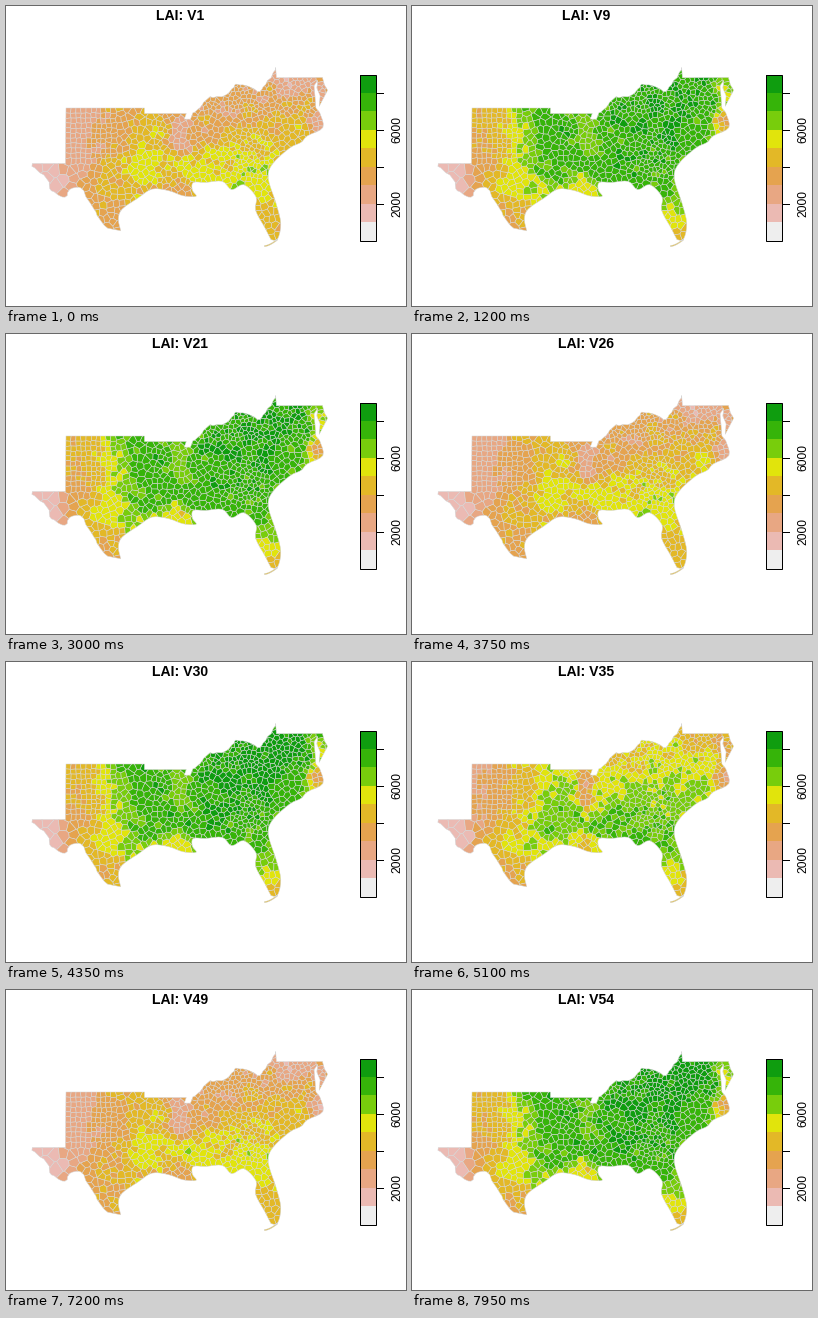
A matplotlib script for the animation above (8000 ms loop, 400 by 300 pixels).

```python
import numpy as np
import matplotlib.pyplot as plt
from matplotlib.animation import FuncAnimation
from matplotlib.collections import PolyCollection
from matplotlib.patches import PathPatch, Rectangle
from matplotlib.path import Path

WIDTH, HEIGHT, DPI = 400, 300, 100
PX = 72 / DPI
TICK_MS, LOOP_MS, STEP_MS = 50, 8000, 150
PALETTE = ["#eeeeee", "#ebbab3", "#e8a783", "#e5a34f", "#e3b827",
           "#e1e40c", "#78cd0c", "#36b409", "#0f9d0f"]
GREY = "#d6d6d6"
plt.rcParams["font.family"] = "Liberation Sans"
rng = np.random.default_rng(12)

# Outline in longitude / latitude, clockwise from the north-west corner
NORTH = [(-103, 37), (-94.62, 37), (-94.62, 36.5), (-90.15, 36.5),
         (-90.37, 36), (-89.7, 36)]
OHIO = [(-89.4, 36.5), (-88.45, 37.3), (-87.6, 37.95), (-86.1, 38),
        (-85.1, 38.9), (-84.4, 39.1), (-82.9, 38.7), (-82.5, 38.45),
        (-81.7, 39.1), (-80.65, 40.4)]
BAY = [(-80.6, 40.65), (-80.52, 39.72), (-75.6, 39.75), (-75.4, 39.1),
       (-75.05, 38.6), (-75.95, 37.15), (-75.85, 38.1), (-76.2, 38.8),
       (-76.1, 39.5), (-76.5, 39), (-76.4, 38.1), (-76.3, 37)]
ATLANTIC = [(-75.9, 36.6), (-75.55, 35.25), (-77.2, 34.5), (-77.9, 33.9),
            (-79.1, 33.4), (-80.9, 32), (-81.4, 30.7), (-80.55, 28.4),
            (-80.05, 26.6), (-80.4, 25.2), (-81.1, 25.15)]
GULF = [(-81.8, 26.3), (-82.75, 27.8), (-82.7, 29), (-84, 30.1),
        (-85.3, 29.65), (-86.3, 30.4), (-88.1, 30.3), (-89.4, 30.3),
        (-89.5, 29.6), (-89.1, 29.05), (-90.5, 29.1), (-92, 29.55),
        (-93.8, 29.7), (-95.3, 28.9), (-97, 27.9), (-97.4, 27), (-97.15, 25.95)]
BORDER = [(-98.4, 26.1), (-99.4, 27), (-100.3, 28.3), (-101.4, 29.75),
          (-102.5, 29.75), (-103.1, 28.98), (-104.5, 29.6), (-105, 30.6),
          (-106.6, 31.8), (-106.6, 32), (-103.06, 32)]

# lon, lat, winter and summer leaf area in thousands
WEST_SITES = [
    (-105, 30.8, 1.5, 1.7), (-102.4, 35.8, 2.2, 4.1), (-102, 32.5, 2.4, 3.6),
    (-99.6, 34.5, 3.1, 4.7), (-98.6, 30.8, 4, 5.4), (-98.3, 27.2, 3.6, 4),
    (-97.3, 34.5, 3.7, 6.4), (-96.3, 29.8, 4.4, 6), (-95.8, 36.2, 4, 7.5),
    (-94.6, 31.5, 5.5, 7.3), (-94, 34.6, 5.1, 8)]
EAST_SITES = [
    (-90.9, 34.5, 2.8, 7), (-92.7, 32.2, 5.3, 7.7), (-91, 29.8, 3.4, 5),
    (-89.6, 31.3, 5.7, 7.8), (-88.7, 35.3, 3.6, 7.8), (-86.8, 32.5, 5.1, 7.9),
    (-85.8, 36.8, 3.2, 8.1), (-81.5, 38, 3.4, 8.5), (-79, 39.1, 2.1, 8.5),
    (-78.2, 37.2, 4.1, 8.2), (-75.9, 35.7, 2.3, 4), (-75.5, 38.8, 2.8, 6.3),
    (-78.5, 35.2, 4.7, 7.3), (-82, 35.9, 4.2, 8.4), (-83.5, 33.5, 4.8, 7.7),
    (-83, 30.9, 5.9, 7.5), (-81.5, 28, 4.8, 6.4), (-80.8, 25.9, 4, 4.6)]
# Season reached in each month: 0 winter, 1 spring, 2 summer, 3 autumn, 4 winter
STAGE = [0, .1, 1, 1.5, 1.85, 2, 2, 2, 2.1, 2.5, 3, 3.5]


def project(points):
    lon, lat = np.asarray(points, float).T
    return np.column_stack([60 + 9.36 * (lon + 103), 102 + 11.11 * (37 - lat)])


def unproject(x, y):
    return (x - 60) / 9.36 - 103, 37 - (y - 102) / 11.11


def closed(points):
    xy = project(points)
    return Path(np.vstack([xy, xy[:1]]), closed=True)


def smooth(points, n=4):
    """Catmull-Rom curve through the points."""
    p = np.asarray(points, float)
    p = np.vstack([p[:1], p, p[-1:]])
    t = np.arange(n)[:, None] / n
    curve = [b + .5 * t * (c - a + t * (2 * a - 5 * b + 4 * c - d
                                        + t * (3 * (b - c) + d - a)))
             for a, b, c, d in zip(p, p[1:], p[2:], p[3:])]
    return np.vstack(curve + [p[-1:]])


def meander(points):
    line = smooth(points)
    return line + rng.uniform(-.08, .08, line.shape)


def spacing(lon, lat):
    """Typical county width in pixels."""
    if lon < -101.5 and lat < 32:
        return 11 if lon < -102.8 else 7
    if lon < -94:
        return 5.9
    if lat < 30.6 and lon > -88:
        return 6.2
    if -85.3 < lon < -81.5 and lat < 35 or -89 < lon < -82 and lat > 36.5:
        return 4.0
    return 4.4 if lon > -82 and lat > 36.5 else 5.2


def place_seeds(land):
    """Surveyed grid in the north-west, blue noise everywhere else."""
    gx, gy = np.meshgrid(np.arange(62.5, 108, 5), np.arange(104.6, 157, 5))
    grid = np.column_stack([gx.ravel(), gy.ravel()])
    grid += rng.uniform(-.5, .5, grid.shape) * (1 + (grid[:, :1] > 85))
    seeds = np.zeros((4000, 2))
    count = len(grid)
    seeds[:count] = grid
    darts = rng.uniform((25, 60), (324, 236), (36000, 2))
    for dart in darts[land.contains_points(darts)]:
        gap = .85 * spacing(*unproject(*dart))
        delta = seeds[:count] - dart
        if np.min((delta ** 2).sum(1)) > gap ** 2:
            seeds[count] = dart
            count += 1
    return seeds[:count]


def clip_half(poly, mid, normal):
    """Keep the part of a complex polygon behind the line through mid."""
    side = [((p - mid) * normal.conjugate()).real for p in poly]
    out = []
    for k, p in enumerate(poly):
        a, b, prev = side[k - 1], side[k], poly[k - 1]
        if (a > 0) != (b > 0):
            out.append(prev + (p - prev) * a / (a - b))
        if b <= 0:
            out.append(p)
    return out


def voronoi(seeds):
    z = seeds[:, 0] + 1j * seeds[:, 1]
    cells = []
    for c in z:
        dist = np.abs(z - c)
        cell = [complex(c) + 20 * k for k in (-1 - 1j, 1 - 1j, 1 + 1j, -1 + 1j)]
        for n in np.argsort(dist)[1:40]:
            if dist[n] > 2 * max(abs(p - c) for p in cell):
                break
            cell = clip_half(cell, complex(c + z[n]) / 2, complex(z[n] - c))
        cells.append([(p.real, p.imag) for p in cell])
    return cells


land = closed(np.vstack([NORTH, meander(OHIO), BAY, smooth(ATLANTIC),
                         smooth(GULF), meander(BORDER[:-2]), BORDER[-2:]]))
reef = np.linspace(0, 1, 9)
reef_lon, reef_lat = -80.4 - 1.4 * reef, 24.52 + .6 * (1 - reef) ** 1.6
keys = np.vstack([np.column_stack([reef_lon, reef_lat]),
                  np.column_stack([reef_lon, reef_lat + .1])[::-1]])
coast = Path.make_compound_path(land, closed(keys))
seeds = place_seeds(land)
sx, sy = seeds.T
lon, lat = unproject(sx, sy)

# Seasonal means for every county
sites = np.array(WEST_SITES + EAST_SITES)
gaps = ((seeds[:, None] - project(sites[:, :2])[None]) ** 2).sum(2)
weights = 1 / (gaps + 60) ** 2
winter, summer = (weights @ sites[:, 2:] / weights.sum(1)[:, None]).T
delta_belt = np.exp(-((lon + 90.9) / .7) ** 2) * (lat > 32)
winter -= .7 * delta_belt
summer -= .5 * delta_belt
early = .25 * np.clip((lat - 33) / 4, 0, 1)
late = np.clip(.75 - .055 * (lat - 30.5), .35, .8)
late = (late - .15 * ((lon < -96) & (lat > 33))) * (1 - .7 * delta_belt)
spring = winter + early * (summer - winter) + .8 * (lat < 28.8) * (lon > -84)
autumn = winter + late * (summer - winter)
seasons = np.array([winter, spring, summer, autumn, winter])

texture = (.22 * np.sin(sx / 5.1 + 2 * np.sin(sy / 9))
           + .2 * np.sin(sy / 4.3 - sx / 11)
           + rng.normal(0, .27, len(seeds)))


def leaf_area(step):
    stage = STAGE[step % 12]
    k = int(stage)
    mean = seasons[k] + (stage - k) * (seasons[k + 1] - seasons[k])
    drift = .12 * np.sin(sx / 23 + 2.3 * step) * np.cos(sy / 17 + 1.7 * step)
    return mean + np.clip((mean - .8) / 3, .2, 1) * (texture + drift)


fig = plt.figure(figsize=(WIDTH / DPI, HEIGHT / DPI), dpi=DPI, facecolor="white")
ax = fig.add_axes([0, 0, 1, 1])
ax.set(xlim=(0, WIDTH), ylim=(HEIGHT, 0))
ax.axis("off")

counties = PolyCollection(voronoi(seeds), edgecolors=GREY, linewidths=.55 * PX)
ax.add_collection(counties, autolim=False)
counties.set_clip_path(coast, ax.transData)
ax.add_patch(PathPatch(coast, fill=False, edgecolor=GREY, lw=.5 * PX))
title = ax.text(174, 14, "", ha="center", va="baseline",
                fontsize=14 * PX, weight="bold")

# Colour key
LEFT, RIGHT, TOP, BOTTOM = 353.5, 369.5, 68.5, 234.5
band = (BOTTOM - TOP) / len(PALETTE)
for k, color in enumerate(PALETTE):
    ax.add_patch(Rectangle((LEFT, BOTTOM - (k + 1) * band), RIGHT - LEFT, band,
                           facecolor=color, lw=0, antialiased=False))
ax.add_patch(Rectangle((LEFT, TOP), RIGHT - LEFT, BOTTOM - TOP, fill=False,
                       edgecolor="black", lw=PX))
for thousands in (2, 4, 6, 8):
    y = BOTTOM - thousands * band
    ax.plot([RIGHT, RIGHT + 7], [y, y], color="black", lw=PX)
    if thousands in (2, 6):
        ax.text(391.5, y, f"{thousands}000", rotation=90, ha="center",
                va="center", fontsize=12 * PX)


def draw(tick):
    step = tick * TICK_MS // STEP_MS
    level = np.clip(leaf_area(step), 0, len(PALETTE) - 1).astype(int)
    counties.set_facecolor([PALETTE[k] for k in level])
    title.set_text(f"LAI: V{step + 1}")
    return counties, title


anim = FuncAnimation(fig, draw, frames=LOOP_MS // TICK_MS, interval=TICK_MS,
                     repeat=True, repeat_delay=0, blit=False)
plt.show()
```
